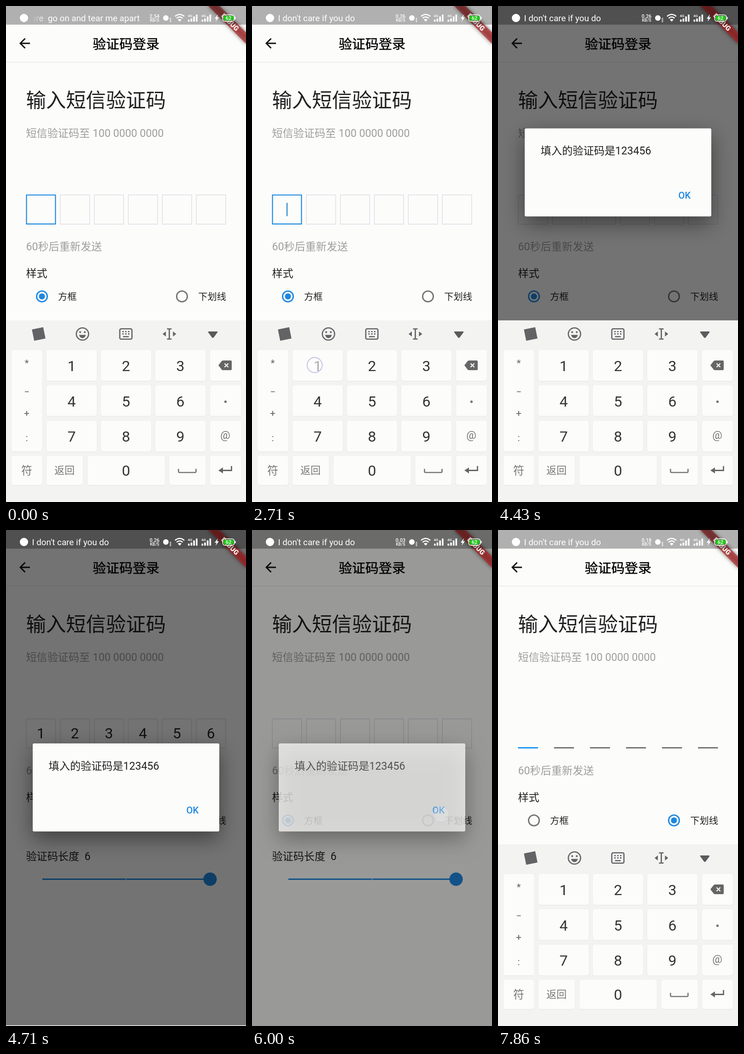
An HTML page with a canvas that plays this animation: 521x1076 px, repeating every 8 s.

```html
<!DOCTYPE html>
<html lang="zh-CN">
<head>
<meta charset="utf-8">
<title>验证码登录</title>
<style>
html, body { margin: 0; width: 100%; height: 100%; overflow: hidden; background: #fcfcfb; }
canvas { display: block; }
</style>
</head>
<body>
<canvas id="stage" width="521" height="1076"></canvas>
<script>
const ctx = document.getElementById('stage').getContext('2d');
const W = 521, H = 1076, LOOP = 8000;
const FONT = 'Roboto, "Noto Sans CJK SC", "Noto Sans CJK", sans-serif';
const PAPER = '#fcfcfb', BLUE = '#1e88e0', INK = '#212121', MUTED = '#9e9e9e', ICON = '#636366';

// Timeline in ms
const KEY_TIMES = [2720, 3050, 3370, 3660, 3960, 4210];
const DIALOG_OPEN = 4270, DIALOG_CLOSE = 5960, FADE = 150;
const KEYS_HIDE = 4500, KEYS_SHOW = 6080, KEYS_SLIDE = 250;
const REFOCUS = 6150, UNDERLINE = 7360;
const LYRIC_CHANGE = 2430;
const SPEEDS = [[0, '2.54'], [2300, '0.26'], [4800, '0.03'], [7200, '0.18']];
const TOUCHES = [
  [1450, 515, 572], [5890, 411, 617], [7300, 390, 631],
  ...KEY_TIMES.map((time, i) => [time, 136 + (i % 3) * 118, 779 + Math.floor(i / 3) * 77])
];

const progress = (t, start, length) => Math.min(1, Math.max(0, (t - start) / length));
const easeOut = p => 1 - (1 - p) ** 3;

function text(str, x, y, size, color = INK, align = 'left', weight = 400) {
  ctx.font = `${weight} ${size}px ${FONT}`;
  ctx.textAlign = align;
  ctx.fillStyle = color;
  ctx.fillText(str, x, y);
}
function rect(x, y, w, h, color, radius = 0) {
  ctx.fillStyle = color;
  ctx.beginPath();
  ctx.roundRect(x, y, w, h, radius);
  ctx.fill();
}
function outline(x, y, w, h, color, width, radius = 0) {
  ctx.strokeStyle = color;
  ctx.lineWidth = width;
  ctx.beginPath();
  ctx.roundRect(x + width / 2, y + width / 2, w - width, h - width, radius);
  ctx.stroke();
}
function circle(x, y, r, color) {
  ctx.fillStyle = color;
  ctx.beginPath();
  ctx.arc(x, y, r, 0, 7);
  ctx.fill();
}
function ring(x, y, r, color, width) {
  ctx.strokeStyle = color;
  ctx.lineWidth = width;
  ctx.beginPath();
  ctx.arc(x, y, r, 0, 7);
  ctx.stroke();
}
function fillPath(d, color) {
  ctx.fillStyle = color;
  ctx.fill(new Path2D(d));
}
function strokePath(d, color, width) {
  ctx.strokeStyle = color;
  ctx.lineWidth = width;
  ctx.stroke(new Path2D(d));
}

function radio(x, label, labelX, selected) {
  ring(x, 630, 11.6, selected ? BLUE : '#757575', 2.9);
  if (selected > 0) circle(x, 630, 6.6 * selected, BLUE);
  text(label, labelX, 638, 20.25);
}

function codeFields(t) {
  const cleared = t >= DIALOG_CLOSE;
  const typed = cleared ? 0 : KEY_TIMES.filter(k => t >= k).length;
  const active = t >= DIALOG_OPEN && t < REFOCUS ? -1 : typed;
  const blinkStart = cleared ? REFOCUS : typed ? KEY_TIMES[typed - 1] : -550;
  const cursorOn = (t - blinkStart) % 1000 < 500;
  const underline = t >= UNDERLINE;
  const size = underline ? 43.4 : 65.1;
  const pitch = underline ? 78.15 : 73.8;
  for (let i = 0; i < 6; i++) {
    const x = 43.4 + i * pitch, mid = x + size / 2, on = i === active;
    if (underline) rect(x, 471, size, 3, on ? '#2196f3' : '#777770');
    else outline(x, 408.9, size, size, on ? BLUE : '#dfdfe8', on ? 2.2 : 1.5);
    if (i < typed) text(i + 1, mid - 0.2, 452, 31.8, INK, 'center');
    if (on && cursorOn) rect(mid - 1.2, 427, 2.6, 29, '#3a95d4');
  }
}

function page(t) {
  rect(0, 0, W, H, PAPER);
  rect(0, 121, W, 1.4, '#e9e9e9');
  strokePath('M52 81H31M41.5 70.5L31 81L41.5 91.5', '#111', 2.9);
  text('验证码登录', 260.5, 92.5, 28.94, '#000', 'center');
  ctx.strokeStyle = '#000';
  ctx.lineWidth = 0.5;
  ctx.strokeText('验证码登录', 260.5, 92.5);

  text('输入短信验证码', 43.4, 220, 43.4);
  text('短信验证码至 100 0000 0000', 43.4, 283.5, 23.15, MUTED);
  codeFields(t);
  text('60秒后重新发送', 43.4, 529.5, 23.15, MUTED);
  text('样式', 43.4, 588, 23.15);
  const switched = progress(t, UNDERLINE, 200);
  radio(78, '方框', 113, 1 - switched);
  radio(382, '下划线', 417.3, switched);
  text('验证码长度  6', 43.4, 715.5, 23.15);
  rect(79, 756, 364, 3, BLUE);
  circle(261, 757.5, 1.5, '#8fc3f0');
  circle(443, 757.5, 14.5, BLUE);
}

function dialog(t, keyboardUp) {
  const alpha = t < DIALOG_CLOSE ? progress(t, DIALOG_OPEN, FADE) : 1 - progress(t, DIALOG_CLOSE, FADE);
  if (!alpha) return;
  const top = 463 - 197.5 * keyboardUp;
  ctx.save();
  ctx.globalAlpha = alpha;
  rect(0, 0, W, H, 'rgba(0,0,0,.54)');
  ctx.shadowColor = 'rgba(0,0,0,.45)';
  ctx.shadowBlur = 46;
  ctx.shadowOffsetY = 16;
  rect(58, top, 405, 191, PAPER, 3);
  ctx.shadowColor = 'transparent';
  text('填入的验证码是123456', 92.6, top + 56.7, 23.15);
  text('OK', 391.5, top + 152, 20.25, BLUE, 'left', 500);
  ctx.restore();
}

function debugBanner() {
  ctx.save();
  ctx.translate(W, 0);
  ctx.rotate(Math.PI / 4);
  ctx.filter = 'blur(5px)';
  rect(-58, 40.5, 116, 17.4, 'rgba(0,0,0,.5)');
  ctx.filter = 'none';
  rect(-58, 40.5, 116, 17.4, 'rgba(183,28,28,.63)');
  text('DEBUG', 0, 54.3, 14.7, '#fff', 'center', 900);
  ctx.restore();
}

function signal(x) {
  text('4G', x - 0.5, 23.5, 8, '#fff', 'left', 500);
  for (let i = 0; i < 4; i++) {
    const h = [4.5, 7, 11.5, 15.5][i];
    rect(x + i * 5.7, 34 - h, 3.6, h, '#fff', 1);
  }
}

function statusBar(t) {
  rect(0, 0, W, 40.5, 'rgba(0,0,0,.3)');
  circle(39, 26, 9, '#fff');
  if (t < LYRIC_CHANGE) {
    const fade = ctx.createLinearGradient(57, 0, 84, 0);
    fade.addColorStop(0, 'rgba(255,255,255,0)');
    fade.addColorStop(1, '#fff');
    text('are  go on and tear me apart', 290.5, 33, 18.8, fade, 'right');
  } else {
    text("I don't care if you do", 56.5, 33, 18.8, '#fff');
  }
  const speed = SPEEDS.filter(([start]) => t >= start).pop()[1];
  text(speed, 322.5, 25.5, 10.8, '#fff', 'center', 500);
  text('KB/S', 322.5, 34, 8.8, '#fff', 'center', 500);

  circle(347, 26, 6, '#fff');
  for (let y = 26; y < 35; y += 2.5) rect(355.5, y, 3, 1.3, '#fff');
  strokePath('M367 22.5Q377 14 387 22.5M370.5 26.5Q377 21 383.5 26.5', '#fff', 2.6);
  fillPath('M373 29.5Q377 26.5 381 29.5L377 34Z', '#fff');
  signal(395);
  signal(424.5);
  fillPath('M460 18L453 27.5H457L455 34L462 24.5H458Z', '#fff');
  outline(469.5, 18.5, 27, 15.5, '#fff', 1.5, 5);
  rect(496.5, 23.5, 2, 5.5, '#fff', 1);
  rect(472, 21, 22, 10.5, '#21c51c', 3.5);
  text('62', 483, 30.3, 11, '#fff', 'center', 500);
}

function key(x, y, w, h) {
  rect(x - 0.6, y - 0.4, w + 1.2, h + 1.8, '#ebebed', 5);
  rect(x, y, w, h, PAPER, 4.5);
}

function toolbar() {
  ctx.save();
  ctx.translate(71, 711.5);
  ctx.rotate(-0.2);
  rect(-12.5, -12.5, 25, 25, ICON);
  ctx.restore();

  ring(166, 711.5, 13.3, ICON, 2.6);
  circle(161, 707.5, 2.1, ICON);
  circle(171, 707.5, 2.1, ICON);
  fillPath('M158.5 713.5H173.5Q171 720.5 166 720.5T158.5 713.5Z', ICON);

  outline(245.7, 699, 29, 25, ICON, 2.6, 3);
  for (let i = 0; i < 6; i++) rect(252.5 + (i % 3) * 6.2, 705 + Math.floor(i / 3) * 5, 3, 2.8, ICON);
  rect(254, 716, 12.5, 2.5, ICON);

  strokePath('M349.5 700.5H359.5M349.5 722.5H359.5M354.5 700.5V722.5', ICON, 2.7);
  fillPath('M340 711.5L347 706V717ZM369.5 711.5L362.5 706V717Z', ICON);
  fillPath('M440 706H458Q460 706 459 708L451 719Q449 721 447 719L439 708Q438 706 440 706Z', '#5b5b5e');
}

function keyboard(shown) {
  if (!shown) return;
  ctx.save();
  ctx.translate(0, (1 - shown) * 394);
  rect(0, 682, W, 394, '#f3f3f2');
  toolbar();

  key(12, 746, 66.5, 220);
  for (const [symbol, y] of [['*', 782], ['−', 843.5], ['+', 890], [':', 944]]) {
    text(symbol, 45, y, 21, '#666', 'center');
  }
  for (let row = 0; row < 3; row++) {
    const y = 746 + row * 76.6;
    for (let col = 0; col < 3; col++) {
      const x = 88 + col * 118;
      key(x, y, 109, 67);
      text(row * 3 + col + 1, x + 54.5, y + 46, 32, '#333', 'center');
    }
    key(443, y, 67, 67);
  }
  for (const [x, w] of [[12, 66.5], [88, 79], [177, 168], [354.5, 79], [443, 67]]) key(x, 975.5, w, 63.5);

  fillPath('M461 779.5L468 770.5Q469 769 471 769H488Q490 769 490 771V788Q490 790 488 790H471Q469 790 468 788.5Z', '#666');
  strokePath('M474.5 775.5L482.5 783.5M482.5 775.5L474.5 783.5', '#fff', 2.2);
  circle(476.5, 858.5, 2.7, '#777');
  text('@', 476, 938.5, 24, '#777', 'center');
  text('符', 45, 1016, 24, '#777', 'center');
  text('返回', 127, 1015, 22, '#777', 'center');
  text('0', 260.5, 1018.5, 32, '#333', 'center');
  strokePath('M374.5 1004V1010Q374.5 1012 377 1012H410Q412.5 1012 412.5 1010V1004', '#777', 2.6);
  strokePath('M489.5 998V1007.5H468', '#666', 2.8);
  fillPath('M461 1007.5L471 1001V1014Z', '#666');
  ctx.restore();
}

function touches(t) {
  for (const [time, x, y] of TOUCHES) {
    if (t < time - 90 || t > time + 110) continue;
    ctx.save();
    ctx.globalAlpha = 1 - 0.7 * progress(t, time, 110);
    circle(x, y, 16.5, 'rgba(255,255,255,.6)');
    ring(x, y, 16.3, 'rgba(192,194,228,.9)', 2.2);
    ctx.restore();
  }
}

function draw(now) {
  const t = now % LOOP;
  const hiding = easeOut(progress(t, KEYS_HIDE, KEYS_SLIDE));
  const showing = easeOut(progress(t, KEYS_SHOW, KEYS_SLIDE));
  const inset = 1 - easeOut(progress(t, KEYS_HIDE, 100));
  page(t);
  dialog(t, inset);
  debugBanner();
  statusBar(t);
  keyboard(1 - hiding + showing);
  touches(t);
}

let start;
function tick(now) {
  start ??= now;
  draw(now - start);
  requestAnimationFrame(tick);
}
draw(0);
requestAnimationFrame(tick);
</script>
</body>
</html>
```
